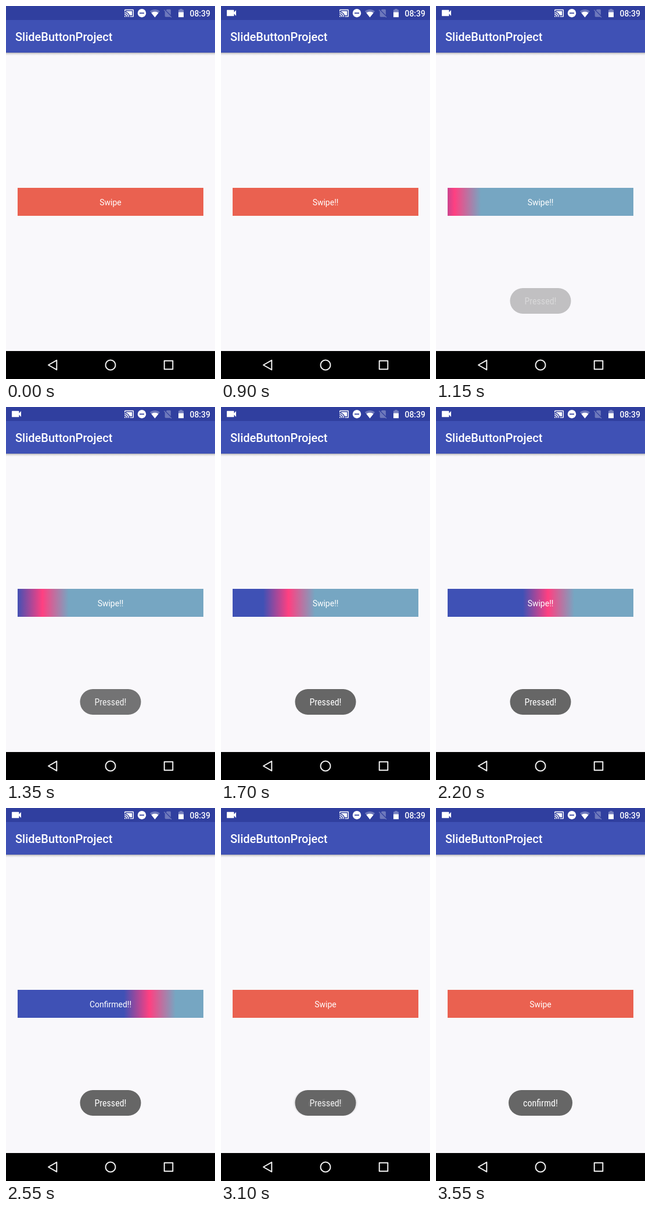
These frames come from a looping animation (360 px wide and 640 px high, 3700 ms). An HTML page with a canvas:

```html
<!DOCTYPE html>
<html lang="en">
<head>
<meta charset="utf-8">
<title>Slide button</title>
<style>
  html, body { margin: 0; width: 100%; height: 100%; overflow: hidden; background: #f9f8fb; }
  canvas { display: block; width: 360px; height: 640px; }
</style>
</head>
<body>
<canvas id="stage"></canvas>
<script>
const W = 360, H = 640, LOOP = 3700, STEP = 50;
const RECORD = 100, PRESS = 900, MOVE = 950, CONFIRM = 2550, RELEASE = 3100;

const canvas = document.getElementById('stage');
const ctx = canvas.getContext('2d');
const dpr = window.devicePixelRatio || 1;
canvas.width = W * dpr;
canvas.height = H * dpr;

// Icons on a 24-unit grid
const icons = {
  cast: 'M1 18v3h3c0-1.66-1.34-3-3-3zm0-4v2c2.76 0 5 2.24 5 5h2c0-3.87-3.13-7-7-7zm18-7H5v1.63c3.96 1.28 7.09 4.41 8.37 8.37H19V7zM1 10v2c4.97 0 9 4.03 9 9h2c0-6.08-4.93-11-11-11zm20-7H3c-1.1 0-2 .9-2 2v3h2V5h18v14h-7v2h7c1.1 0 2-.9 2-2V5c0-1.1-.9-2-2-2z',
  wifi: 'M12 21.5L23.64 7C23.2 6.66 18.7 3 12 3S.81 6.66.36 7z',
  wifiLevel: 'M3.53 10.95L12 21.5l8.47-10.55C20.04 10.62 16.81 8 12 8s-8.04 2.62-8.47 2.95z',
  noSim: 'M19 5c0-1.1-.9-2-2-2h-7L7.66 5.34 19 16.68zM3.65 3.88L2.38 5.15 5 7.77V19c0 1.1.9 2 2 2h10c.35 0 .67-.1.96-.26l1.88 1.88 1.27-1.27z',
  video: 'M17 10.5V7c0-.55-.45-1-1-1H4c-.55 0-1 .45-1 1v10c0 .55.45 1 1 1h12c.55 0 1-.45 1-1v-3.5l4 4v-11z'
};
for (const k in icons) icons[k] = new Path2D(icons[k]);

const clamp = v => Math.min(1, Math.max(0, v));

function rect(color, x, y, w, h) {
  ctx.fillStyle = color;
  ctx.fillRect(x, y, w, h);
}

function icon(name, x, y, scale, alpha = 1) {
  ctx.save();
  ctx.globalAlpha = alpha;
  ctx.translate(x, y);
  ctx.scale(scale, scale);
  ctx.fillStyle = '#fff';
  ctx.fill(icons[name]);
  ctx.restore();
}

function text(str, x, y, font, align = 'center') {
  ctx.font = font;
  ctx.textAlign = align;
  ctx.fillStyle = '#fff';
  ctx.fillText(str, x, y);
}

function statusBar(t) {
  rect('#303f9f', 0, 0, W, 24);
  if (t >= RECORD) icon('video', 7.33, 1.33, 0.889);
  icon('cast', 203.3, 3.6, 0.727);

  ctx.fillStyle = '#fff';
  ctx.beginPath();
  ctx.arc(234, 12.2, 7.2, 0, Math.PI * 2);
  ctx.fill();
  rect('#303f9f', 230, 11.4, 8, 1.7);

  icon('wifi', 247.7, 3.8, 0.73, 0.3);
  icon('wifiLevel', 247.7, 3.8, 0.73);
  icon('noSim', 270, 3.5, 0.73, 0.3);

  rect('rgba(255,255,255,.35)', 299.3, 5, 4.4, 1.5);
  rect('rgba(255,255,255,.35)', 297, 6.5, 9, 4);
  rect('#fff', 297, 10.5, 9, 8.7);
  text('08:39', 352, 17.5, '500 14px Roboto, sans-serif', 'right');
}

function appBar() {
  const shade = ctx.createLinearGradient(0, 80, 0, 85);
  shade.addColorStop(0, 'rgba(0,0,0,.3)');
  shade.addColorStop(0.4, 'rgba(0,0,0,.11)');
  shade.addColorStop(1, 'rgba(0,0,0,0)');
  rect(shade, 0, 80, W, 5);
  rect('#3f51b5', 0, 24, W, 56);
  text('SlideButtonProject', 16, 59.5, '500 20px Roboto, sans-serif', 'left');
}

function navBar() {
  rect('#000', 0, 592, W, 48);
  ctx.strokeStyle = '#f2f2f2';
  ctx.lineWidth = 2;
  ctx.lineJoin = 'round';
  ctx.beginPath();
  ctx.moveTo(73, 616);
  ctx.lineTo(87.3, 607.8);
  ctx.lineTo(87.3, 624.2);
  ctx.closePath();
  ctx.stroke();
  ctx.beginPath();
  ctx.arc(180, 616, 8.5, 0, Math.PI * 2);
  ctx.stroke();
  ctx.strokeRect(272.7, 608.7, 14.6, 14.6);
}

function button(t) {
  let fill = '#ea6150', label = 'Swipe';
  if (t >= PRESS && t < RELEASE) label = t < CONFIRM ? 'Swipe!!' : 'Confirmed!!';
  if (t >= MOVE && t < RELEASE) {
    const end = 108 + 0.1535 * (Math.min(t, CONFIRM) - 1350);
    fill = ctx.createLinearGradient(end - 89, 0, end, 0);
    fill.addColorStop(0, '#3f51b5');
    fill.addColorStop(0.49, '#ff4081');
    fill.addColorStop(1, '#76a6c2');
  }
  rect(fill, 20, 312, 320, 48);
  text(label, 180, 341.5, '14px Roboto, sans-serif');
}

function toast(str, width, alpha) {
  if (alpha <= 0) return;
  ctx.save();
  ctx.globalAlpha = alpha;
  ctx.fillStyle = '#666';
  ctx.beginPath();
  ctx.roundRect(180 - width / 2, 484, width, 44, 22);
  ctx.fill();
  ctx.fontStretch = 'condensed';
  const face = 'px "Roboto Condensed", Roboto, sans-serif';
  ctx.font = 16 + face;
  // Smaller size where no condensed face exists
  const size = ctx.measureText(str).width > width - 46 ? 14.4 : 16;
  text(str, 180, 512, size + face);
  ctx.restore();
}

function fadeIn(t, start) {
  const a = 1 - (1 - clamp((t - start) / 420)) ** 2;
  return a > 0.95 ? 1 : a;
}

const fadeOut = (t, start) => 1 - clamp((t - start) / 350) ** 2;

function draw(t) {
  ctx.setTransform(dpr, 0, 0, dpr, 0, 0);
  rect('#f9f8fb', 0, 0, W, H);
  statusBar(t);
  appBar();
  button(t);
  toast('Pressed!', 105, fadeIn(t, 1060) * fadeOut(t, 3060));
  toast('confirmd!', 110, fadeIn(t, 3080));
  navBar();
}

const origin = performance.now();
function frame() {
  const t = (performance.now() - origin) % LOOP;
  draw(Math.floor(t / STEP) * STEP);
  requestAnimationFrame(frame);
}
frame();
</script>
</body>
</html>
```
